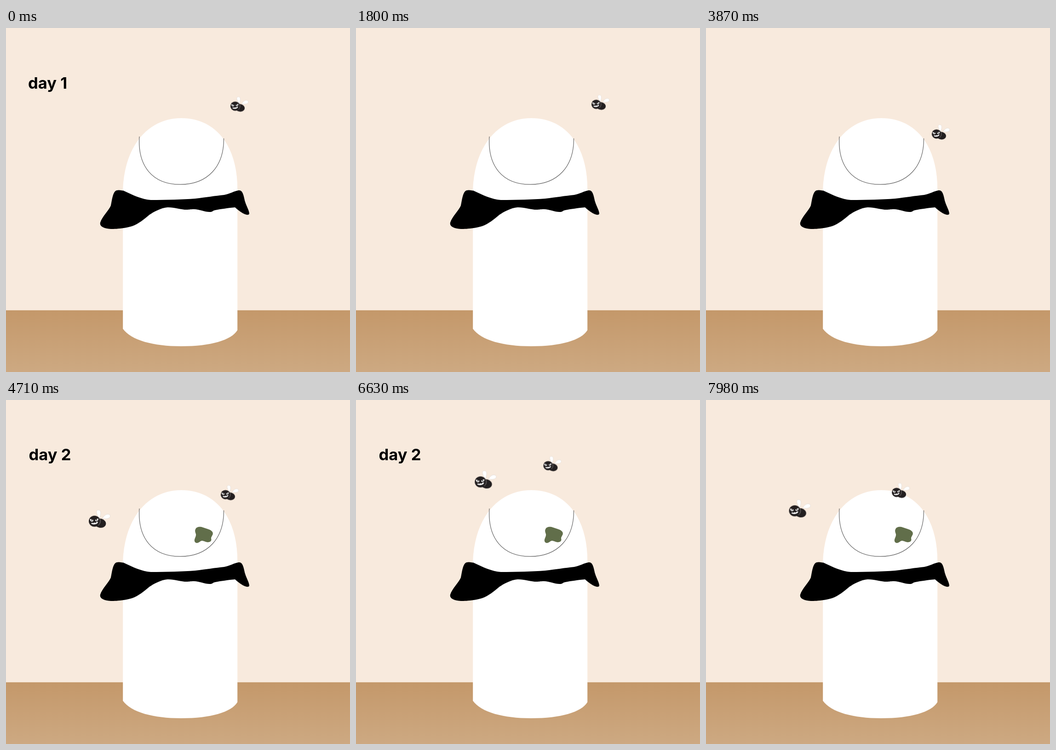
Animation, 748 px wide and 748 px high, one loop 8000 ms. Source, as an HTML page:

```html
<!DOCTYPE html>
<html lang="en">
<head>
<meta charset="utf-8">
<title>Bin and flies</title>
<style>
  html, body { margin: 0; width: 100%; height: 100%; overflow: hidden; background: #f8eadd; }
  svg { display: block; width: 100vw; height: 100vh; }
  text { font: 700 34.5px Inter, sans-serif; }
</style>
</head>
<body>
<svg viewBox="0 0 748 748">
  <defs>
    <linearGradient id="wood" x1="0" y1="0" x2="0" y2="1">
      <stop offset="0" stop-color="#c4986a"/>
      <stop offset="1" stop-color="#cda982"/>
    </linearGradient>
    <g id="fly">
      <g fill="#fff" stroke="#d5cfca" stroke-width=".5">
        <path d="M18.500 14C15 9 13 4 14.500 1.500C16.500 -.7 21 0 21.500 4C21.800 8 20.500 11 20 14Z"/>
        <path d="M24.500 15.500C27 11 31 7.500 35 7.700C39 8.200 40 12 37.500 14C34 16.500 29 16 24.500 15.500Z"/>
      </g>
      <ellipse cx="20.700" cy="24" rx="10.500" ry="8.300" transform="rotate(12 20.700 24)" fill="#231f20"/>
      <ellipse cx="10.400" cy="20.400" rx="10.400" ry="10" fill="#231f20"/>
      <path d="M18 13.500C22.500 18 21.500 25 17 28" fill="none" stroke="#b9b4b0" stroke-width=".6"/>
      <path d="M2.200 16L8.300 18.300C8.300 22.600 1.800 22 2.200 16ZM11.500 18.300L17 15.300C18.600 20.200 12.300 22.600 11.500 18.300Z" fill="#fff"/>
      <circle cx="5.500" cy="18.700" r=".9"/>
      <circle cx="14.300" cy="18.300" r=".9"/>
      <path d="M4 24.500L6.300 23.100L8 24.300L10 22.800L12 23.800L14 21.900L16.800 21.600C16.300 26.300 8 28 4 24.500Z" fill="#fff"/>
    </g>
  </defs>

  <rect width="748" height="748" fill="#f8eadd"/>
  <rect y="613.800" width="748" height="135" fill="url(#wood)"/>
  <path fill="#fff" d="M254.200 654V350C258 255 310 196 381 196C456 196 503.200 256 503.200 350V657C490 679 445 692 381 692C320 692 272 679 254.200 654Z"/>
  <path fill="none" stroke="#666" stroke-width="1.200" d="M290 236C286 300 318 340 379 340.200C440 340 474 300 473.500 240"/>
  <path d="M241 353C246 351.500 251 353.500 255 353.500C275 363 296 373 315 374C350 374 385 373 411 371C435 368 455 365 474 363C486 361 497 354 506 353C516 352 517 368 520 378C523 388 529 397 529 404C526 410 512 403 498 390C485 391 465 394 455 396C449 397 449 400 445 400C435 401 420 394 409 394C400 394 399 395 393 395C380 395 362 389 351 390C337 391 321 400 312 406C300 416 288 426 274 431C258 436 238 437 228 437C212 436 203 431 205 423C209 410 224 396 228 386C230 378 232 354 241 353Z"/>
  <path id="mould" fill="#616e4a" d="M412 281C414 275 423 275 428 277C436 280 445 281 449 287C452 293 446 296 446 301C448 307 443 310 437 309C431 308 428 304 423 307C419 310 415 313 411 309C407 303 414 298 413 292C412 288 410 285 412 281Z"/>
  <text id="day1" x="48" y="132">day 1</text>
  <text id="day2" x="49.500" y="130.500">day 2</text>
  <use id="smallFly" href="#fly"/>
  <g id="bigFlyLife"><use id="bigFly" href="#fly"/></g>
</svg>
<script>
  const LOOP = 8000;
  const DAY1_END = 1200, DAY2_START = 4440, DAY2_END = 6960;

  function play(id, keyframes) {
    document.getElementById(id).animate(keyframes, { duration: LOOP, iterations: Infinity });
  }

  // Straight flight between turning points: time, x, y
  function fly(id, scale, turns) {
    const pose = ([time, x, y]) => ({
      offset: time / LOOP,
      transform: `translate(${x}px, ${y}px) scale(${scale})`
    });
    const [, ...first] = turns[0], [, ...last] = turns[turns.length - 1];
    play(id, [[0, ...first], ...turns, [LOOP, ...last]].map(pose));
  }

  function showBetween(id, from, to) {
    const key = (time, opacity) => ({ offset: time / LOOP, opacity, easing: 'step-end' });
    play(id, [key(0, from ? 0 : 1), key(from, 1), key(to, to < LOOP ? 0 : 1), key(LOOP, 0)]);
  }

  fly('smallFly', 1, [
    [0, 488, 149.5], [300, 455, 145], [900, 390, 213], [1660, 520, 161],
    [1800, 512, 145.5], [2480, 438, 115], [2670, 443, 129.5],
    [3900, 492, 212], [6900, 399, 113.5], [7980, 404, 180.5]
  ]);
  fly('bigFly', 1.2, [
    [4890, 180, 239], [5400, 225, 220.3], [5670, 266, 220],
    [6480, 267, 146.5], [7980, 180.5, 216.4]
  ]);

  showBetween('day1', 0, DAY1_END);
  showBetween('day2', DAY2_START, DAY2_END);
  showBetween('mould', DAY2_START, LOOP);
  showBetween('bigFlyLife', DAY2_START, LOOP);
</script>
</body>
</html>
```
